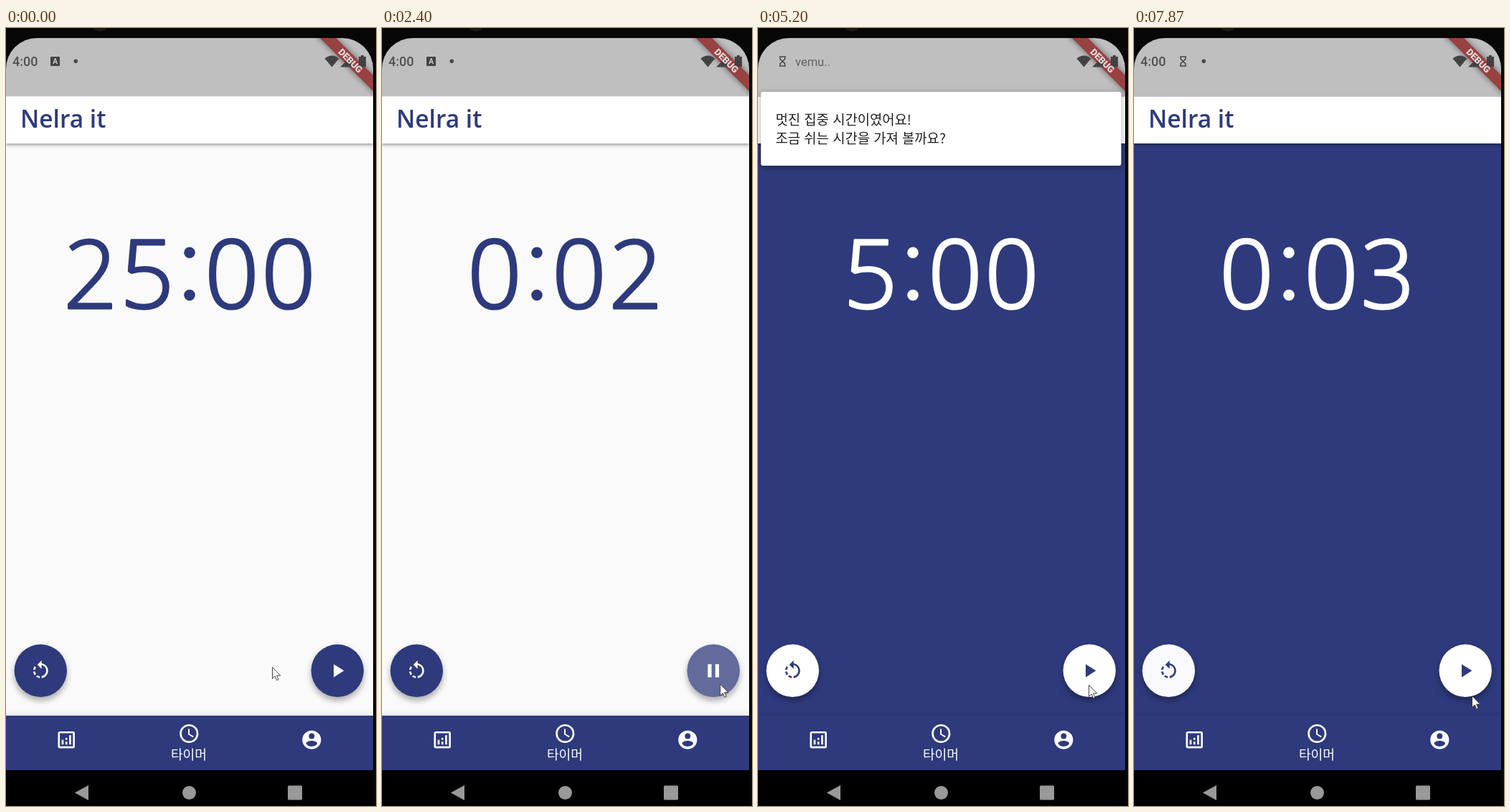
Write an HTML page that moves like this. It is 516 px wide and 1085 px high and loops after 8000 ms.

```html
<!DOCTYPE html>
<html lang="ko">
<head>
<meta charset="utf-8">
<title>Timer</title>
<style>
  html, body { margin: 0; width: 100%; height: 100%; overflow: hidden; background: #070707; }
  svg { display: block; width: 100%; height: 100%; }
  .kr { font-family: "Noto Sans CJK KR", "Noto Sans CJK", "Noto Sans CJK JP", sans-serif; }
  .status { font-family: Roboto, sans-serif; }
  .title { font: 600 33.5px "Open Sans", sans-serif; fill: #2e3a7c; }
  .digits { font: 300 132px "Open Sans", sans-serif; text-anchor: middle; stroke-width: 3; stroke-linejoin: round; }
  .bar { filter: drop-shadow(0 2px 2.5px rgba(0,0,0,.4)); }
  .nav { filter: drop-shadow(0 -1px 4px rgba(0,0,0,.12)); }
  .fab { filter: drop-shadow(0 5px 4px rgba(0,0,0,.32)); }
  .card { filter: drop-shadow(0 2px 4px rgba(0,0,0,.35)); }
</style>
</head>
<body>
<svg viewBox="0 0 516 1085">
  <defs>
    <clipPath id="screen"><rect y="14" width="512" height="1200" rx="43"/></clipPath>
    <filter id="blur" x="-20%" y="-150%" width="140%" height="400%"><feGaussianBlur stdDeviation="4.5"/></filter>
    <path id="hourglass" d="M1 1H10M1 14H10M2.2 1V4.3L5.5 7.5L8.8 4.3V1M2.2 14V10.7L5.5 7.5L8.8 10.7V14" fill="none" stroke="#4a4a4a" stroke-width="1.6"/>
  </defs>
  <circle cx="131" cy="-6" r="11" fill="#191919"/>

  <g clip-path="url(#screen)">
    <rect id="page" y="95" width="512" height="940"/>
    <g id="clock">
      <text id="digits" class="digits" y="390.5"></text>
      <circle class="dot" cy="313.3" r="7.8"/>
      <circle class="dot" cy="372.5" r="7.8"/>
    </g>
    <rect class="bar" y="95.3" width="512" height="65.7" fill="#fff"/>
    <text class="title" x="20" y="139">Nelra it</text>

    <g id="buttons">
      <g transform="translate(48.300 896.300)">
        <circle class="fab" r="36.700"/>
        <circle id="inkReset" class="ink" r="36.700"/>
        <path class="icon" transform="scale(1.306) translate(-12 -12)" d="M7.110 8.530L5.700 7.110C4.800 8.270 4.240 9.610 4.070 11h2.020c.14-.87.49-1.72 1.020-2.470zM6.090 13H4.070c.17 1.390.72 2.730 1.620 3.890l1.410-1.420c-.52-.75-.87-1.590-1.010-2.470zm1.010 5.320c1.160.9 2.510 1.440 3.900 1.610V17.900c-.87-.15-1.710-.49-2.460-1.030L7.100 18.320zM13 4.070V1L8.450 5.550 13 10V6.090c2.840.48 5 2.940 5 5.910s-2.160 5.430-5 5.910v2.020c3.950-.49 7-3.850 7-7.930s-3.050-7.440-7-7.930z"/>
      </g>
      <g transform="translate(462.200 896.300)">
        <circle class="fab" r="36.700"/>
        <circle id="inkPlay" class="ink" r="36.700"/>
        <path id="toggle" class="icon" transform="scale(1.306) translate(-12 -12)"/>
      </g>
    </g>

    <rect class="nav" y="959" width="512" height="76" fill="#2e3a7c"/>
    <g fill="#fff">
      <g transform="translate(84.200 992.700) scale(1.306) translate(-12 -12)">
        <rect x="4" y="4" width="16" height="16" rx="1" fill="none" stroke="#fff" stroke-width="2"/>
        <path d="M7 12h2v5H7zM15 7h2v10h-2zM11 14h2v3h-2zM11 10h2v2h-2z"/>
      </g>
      <g transform="translate(255.300 984) scale(1.306)" fill="none" stroke="#fff">
        <circle r="9" stroke-width="2"/>
        <path d="M-.25 -5V.6L4.600 3.500" stroke-width="1.500"/>
      </g>
      <g transform="translate(426.300 992.700) scale(1.306)">
        <circle r="10"/>
        <g fill="#2e3a7c">
          <circle cy="-4" r="3"/>
          <path d="M-6 3.980C-5.970 1.990 -2 .9 0 .9S5.970 1.990 6 3.980A7.200 7.200 0 0 1 -6 3.980Z"/>
        </g>
      </g>
      <text class="kr" x="255" y="1020" font-size="18.200" text-anchor="middle">타이머</text>
    </g>

    <rect y="14" width="512" height="81.300" fill="#bfbfbf"/>
    <g transform="translate(512 14) rotate(45)">
      <rect x="-75" y="36.700" width="150" height="15.700" opacity=".5" filter="url(#blur)"/>
      <rect x="-75" y="36.700" width="150" height="15.700" fill="#984141"/>
    </g>
    <g fill="#424242">
      <path d="M444.500 42.500Q454.500 34.500 464.500 42.500L454.500 54.500Z"/>
      <path d="M482 38.500V54.500H466Z"/>
      <path d="M492 40h3v-2h4v2h3v14.500h-10z"/>
    </g>
    <text class="status" transform="translate(480.500 45.500) rotate(45)" y="4.700" font-size="13" font-weight="900" text-anchor="middle" fill="#e8dddd">DEBUG</text>

    <g id="idle" class="status">
      <text x="9" y="53.300" font-size="18" font-weight="500" fill="#505050">4:00</text>
      <g id="badge">
        <rect x="62" y="40" width="13" height="13" rx="1" fill="#444"/>
        <text x="68.500" y="50.200" font-size="10" font-weight="700" text-anchor="middle" fill="#ccc">A</text>
      </g>
      <use id="waiting" href="#hourglass" x="63" y="39"/>
      <circle cx="97.300" cy="46.300" r="2.800" fill="#4a4a4a"/>
    </g>
    <g id="alert" class="status">
      <use href="#hourglass" x="28.700" y="39"/>
      <text x="52" y="53" font-size="16.500" fill="#626262">vemu..</text>
    </g>
    <g id="card">
      <rect class="card" x="4" y="89" width="502.500" height="103" rx="3" fill="#fff"/>
      <g class="kr" font-size="18.800" fill="#212121">
        <text x="24.500" y="135">멋진 집중 시간이였어요!</text>
        <text x="24.500" y="160.500">조금 쉬는 시간을 가져 볼까요?</text>
      </g>
    </g>

    <rect y="1035" width="512" height="50"/>
    <g fill="#999">
      <path d="M96 1066.500L115 1056V1077Z"/>
      <circle cx="255.500" cy="1066.500" r="9.500"/>
      <rect x="393" y="1056.500" width="20" height="20" rx="1.500"/>
    </g>
  </g>
  <path id="cursor" d="M.5 .5V16.500L4.200 13L6.600 18.700L9 17.700L6.600 12.100H11.700Z" fill="#fff" stroke="#333" stroke-width=".9"/>
</svg>

<script>
  const LOOP = 8000, RATE = 15;
  const BLUE = "#2e3a7c", WHITE = "#fff";
  const PLAY = "M8 5v14l11-7z", PAUSE = "M6 19h4V5H6zM14 5v14h4V5z";
  const $ = id => document.getElementById(id);
  const all = (sel, attrs) => document.querySelectorAll(sel).forEach(el => {
    for (const name in attrs) el.setAttribute(name, attrs[name]);
  });
  const set = (id, attrs) => all("#" + id, attrs);
  const show = (id, on) => set(id, { display: on ? "inline" : "none" });

  // All times below are ticks, 15 a second.
  const REST = 66, ALERT = 70, SWIPE = 104, CLOSED = 109;
  const sessions = [
    { at: 0, left: 25 * 60, run: 8 },
    { at: 22, left: 3, run: 33, reset: true },
    { at: REST, left: 5 * 60 },
    { at: 114, left: 3, reset: true }
  ];
  const home = { x: 371, y: 891 };
  const moves = [
    { from: 0, to: 5, x: 452, y: 888 },
    { from: 12, to: 20, x: 60, y: 905 },
    { from: 22, to: 25, x: 111, y: 895 },
    { from: 25, to: 27, x: 396, y: 905 },
    { from: 30, to: 33, x: 490, y: 912 },
    { from: 33, to: 38, x: 461, y: 916 },
    { from: 87, to: 102, x: 308, y: 103 },
    { from: SWIPE, to: 107, x: 300, y: 34 },
    { from: 107, to: 113, x: 60, y: 900 },
    { from: 114, to: 118, x: 471, y: 931 }
  ];

  const span = (n, a, b) => Math.min(1, Math.max(0, (n - a) / (b - a)));
  const smooth = p => p * p * (3 - 2 * p);
  const ripple = (n, press) => press === undefined ? 0 : Math.sin(Math.PI * span(n, press, press + 5));

  function pointer(n) {
    return moves.reduce((pos, m) => {
      const p = smooth(span(n, m.from, m.to));
      return { x: pos.x + (m.x - pos.x) * p, y: pos.y + (m.y - pos.y) * p };
    }, home);
  }

  // The first second is counted almost at once after the press.
  function secondsLeft(s, n) {
    const passed = n < s.run ? 0 : Math.floor((n - s.run + 13) / RATE);
    return s.run === undefined ? s.left : Math.max(1, s.left - passed);
  }

  function drawClock(total) {
    const min = String(Math.floor(total / 60));
    const sec = String(total % 60).padStart(2, "0");
    const colon = min.length > 1 ? 256 : 216;
    const xs = [colon - 59, colon + 59, colon + 138];
    if (min.length > 1) xs.unshift(colon - 138);
    set("digits", { x: xs.join(" ") });
    $("digits").textContent = min + sec;
    all(".dot", { cx: colon });
  }

  function drawAlert(n) {
    const alerting = n > ALERT && n < CLOSED;
    show("idle", !alerting);
    show("alert", alerting);
    show("badge", n <= ALERT);
    show("waiting", n >= CLOSED);
    show("card", alerting);

    const enter = span(n, ALERT, ALERT + 8), leave = span(n, SWIPE, CLOSED);
    const dy = -53 * (1 - enter) ** 3 - 210 * leave ** 2;
    set("card", { transform: `translate(0 ${dy})`, opacity: Math.min(1, enter * 3) });
  }

  function draw(ms) {
    const n = Math.floor((ms + 4) * RATE / 1000);
    const session = sessions.filter(s => s.at <= n).pop();
    const rest = n >= REST;
    const front = rest ? WHITE : BLUE, back = rest ? BLUE : WHITE;
    const strength = rest ? .04 : .26;

    set("page", { fill: rest ? BLUE : "#fafafa" });
    set("clock", { fill: front, stroke: front, "stroke-width": 0 });
    set("buttons", { fill: front });
    all(".icon, .ink", { fill: back });
    set("toggle", { d: n >= session.run ? PAUSE : PLAY });
    set("inkReset", { opacity: session.reset ? strength * ripple(n, session.at) : 0 });
    set("inkPlay", { opacity: strength * ripple(n, session.run) });
    drawClock(secondsLeft(session, n));
    drawAlert(n);

    const { x, y } = pointer(n);
    set("cursor", { transform: `translate(${x} ${y})` });
  }

  const start = performance.now();
  function tick() {
    draw((performance.now() - start) % LOOP);
    requestAnimationFrame(tick);
  }
  draw(0);
  tick();
</script>
</body>
</html>
```
